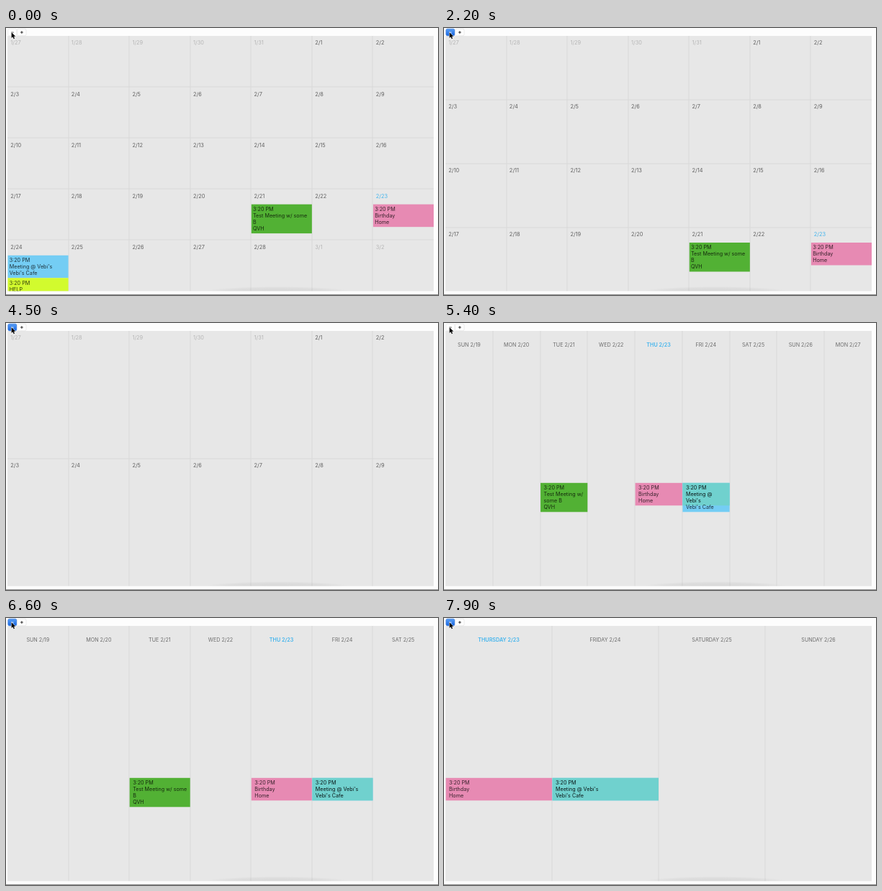
An HTML page with a canvas that plays this animation: 600 px wide and 372 px high, repeating every 8 s.

```html
<!DOCTYPE html>
<html lang="en">
<head>
<meta charset="utf-8">
<title>Calendar zoom</title>
<style>
  html, body { margin: 0; width: 100%; height: 100%; overflow: hidden; background: #fdfdfd; }
  canvas { display: block; }
</style>
</head>
<body>
<canvas id="stage" width="600" height="372"></canvas>
<script>
const ctx = document.getElementById('stage').getContext('2d');
const LOOP = 8000;
const GRID = { x: 2, y: 11, w: 592, h: 355.6 };
const TODAY = 23;
const LINE_HEIGHT = 9;
const EVENT_FONT = '7.2px Inter, sans-serif';

// [start ms, unit, count]
const VIEWS = [
  [0, 'weeks', 5], [900, 'weeks', 4], [2400, 'weeks', 3], [3700, 'weeks', 2],
  [5100, 'days', 10], [5400, 'days', 9], [5700, 'days', 8], [6200, 'days', 7],
  [6800, 'days', 6], [7100, 'days', 5], [7400, 'days', 4]
];

// The minus button alternates between pressed and released at these times.
const TOGGLES = [
  300, 900, 1000, 1100, 1200, 1500, 1600, 1800, 2000, 2100, 2200, 2700, 2900, 3000, 3100,
  4100, 4500, 4600, 4700, 4800, 4900, 5100, 5200, 5300, 5500, 5700, 5800, 6000, 6100,
  6200, 6300, 6400, 6600, 6700, 6800, 6900, 7000, 7100, 7200, 7300, 7400, 7500, 7600,
  7800, 7900
];

const EVENTS = [
  { day: 21, color: '#52b134', title: 'Test Meeting w/ some B', place: 'QVH' },
  { day: 23, color: '#e78ab3', title: 'Birthday', place: 'Home' },
  { day: 24, color: '#74cdf4', title: "Meeting @ Vebi's", place: "Vebi's Cafe" },
  { day: 24, color: '#d2fb2e', title: 'HELP', place: 'Home', monthOnly: true }
];

const WEEKDAYS = ['SUNDAY', 'MONDAY', 'TUESDAY', 'WEDNESDAY', 'THURSDAY', 'FRIDAY', 'SATURDAY'];

function rect(x, y, w, h, color) {
  ctx.fillStyle = color;
  ctx.fillRect(x, y, w, h);
}

function text(string, x, y, color, font, align = 'left') {
  ctx.font = font;
  ctx.textAlign = align;
  ctx.fillStyle = color;
  ctx.fillText(string, x, y);
}

function wrap(string, width) {
  ctx.font = EVENT_FONT;
  const lines = [];
  let line = '';
  for (const word of string.split(' ')) {
    const longer = line ? line + ' ' + word : word;
    if (line && ctx.measureText(longer).width > width) {
      lines.push(line);
      line = word;
    } else {
      line = longer;
    }
  }
  return [...lines, line];
}

// Draws one event and returns its height.
function drawEvent(event, x, y, width, inDays) {
  const lines = ['3:20 PM', ...wrap(event.title, width - 9), event.place];
  const height = lines.length * LINE_HEIGHT + 4.5;
  const doubled = inDays && event.day === 24;
  rect(x + 0.5, y, width - 0.5, height, event.color);
  if (doubled) rect(x + 0.5, y, width - 0.5, 3 * LINE_HEIGHT + 4.5, '#70d1ce');
  lines.forEach((line, i) => text(line, x + (inDays ? 5 : 2.7), y + 9.3 + i * LINE_HEIGHT,
    doubled && i < 3 ? '#0a1616' : 'rgba(0,0,0,.76)', EVENT_FONT));
  return height;
}

function columnLines(count) {
  for (let i = 1; i < count; i++) {
    rect(Math.round(GRID.x + i * GRID.w / count) - 0.5, GRID.y, 1, GRID.h, '#d9d9d9');
  }
}

function monthDate(index) {
  if (index < 5) return [1, 27 + index];
  if (index < 33) return [2, index - 4];
  return [3, index - 32];
}

function drawWeeks(count) {
  const colW = GRID.w / 7, rowH = GRID.h / count;
  columnLines(7);
  for (let r = 1; r < count; r++) {
    rect(GRID.x, Math.round(GRID.y + r * rowH) - 0.5, GRID.w, 1, '#dadada');
  }
  for (let i = 0; i < count * 7; i++) {
    const x = GRID.x + (i % 7) * colW;
    const y = GRID.y + Math.floor(i / 7) * rowH;
    const [month, day] = monthDate(i);
    const today = month === 2 && day === TODAY;
    const color = today ? '#41b4ed' : month === 2 ? '#606060' : '#b5b5b5';
    text(`${month}/${day}`, x + 4.3, y + 12.4, color, '7.4px Inter, sans-serif');
    if (month !== 2) continue;
    let top = y + 21.3;
    for (const event of EVENTS) {
      if (event.day === day) top += drawEvent(event, x, top, colW, false);
    }
  }
}

function drawDays(count) {
  const colW = GRID.w / count;
  const first = count > 4 ? 19 : TODAY;
  columnLines(count);
  for (let i = 0; i < count; i++) {
    const day = first + i, x = GRID.x + i * colW;
    const name = WEEKDAYS[(day - 19) % 7];
    const today = day === TODAY;
    text(`${count > 4 ? name.slice(0, 3) : name} 2/${day}`, x + colW / 2, 32.7,
      today ? '#41b4ed' : '#6c6c6c', `${today ? 600 : 400} 7.2px Inter, sans-serif`, 'center');
    for (const event of EVENTS) {
      if (event.day === day && !event.monthOnly) drawEvent(event, x, 222.8, colW, true);
    }
  }
}

function drawDockShadow() {
  ctx.save();
  ctx.translate(377, 367);
  ctx.scale(100, 7);
  const glow = ctx.createRadialGradient(0, 0, 0, 0, 0, 1);
  glow.addColorStop(0, 'rgba(0,0,0,.07)');
  glow.addColorStop(0.7, 'rgba(0,0,0,.045)');
  glow.addColorStop(1, 'rgba(0,0,0,0)');
  rect(-1, -1, 2, 1, glow);
  ctx.restore();
}

function button(x, w, fill, border) {
  ctx.beginPath();
  ctx.roundRect(x, 1.2, w, 9.6, 2);
  ctx.fillStyle = fill;
  ctx.fill();
  ctx.strokeStyle = border;
  ctx.lineWidth = 0.6;
  ctx.stroke();
}

function drawButtons(pressed) {
  const blue = ctx.createLinearGradient(0, 1, 0, 11);
  blue.addColorStop(0, '#5a9ff5');
  blue.addColorStop(1, '#1766e2');
  button(2.8, 12, pressed ? blue : '#ffffff', pressed ? '#2a6fd8' : '#e2e2e2');
  button(15.6, 12.4, '#ffffff', '#dedede');
  rect(7, 5.6, 3.6, 0.9, pressed ? '#ffffff' : '#333333');
  rect(20, 5.6, 3.8, 0.9, '#222222');
  rect(21.45, 4.1, 0.9, 3.8, '#222222');
}

function drawCursor() {
  ctx.lineWidth = 1;
  ctx.strokeStyle = '#ffffff';
  ctx.fillStyle = '#000000';
  const arrow = new Path2D('M7.6 5.9V13.9L9.4 12.2L10.7 15.2L12 14.6L10.8 11.8H13.2Z');
  ctx.stroke(arrow);
  ctx.fill(arrow);
}

function draw(time) {
  rect(0, 0, 600, 372, '#fdfdfd');
  rect(GRID.x, GRID.y, GRID.w, GRID.h, '#e7e7e7');
  ctx.save();
  ctx.beginPath();
  ctx.rect(GRID.x, GRID.y, GRID.w, GRID.h);
  ctx.clip();
  const [, unit, count] = VIEWS.findLast(view => view[0] <= time);
  if (unit === 'weeks') drawWeeks(count);
  else drawDays(count);
  drawDockShadow();
  ctx.restore();
  rect(0, 371, 600, 1, '#8c8c8c');
  drawButtons(TOGGLES.filter(t => t <= time).length % 2 === 1);
  drawCursor();
}

const start = performance.now();
function frame() {
  draw((performance.now() - start) % LOOP);
  requestAnimationFrame(frame);
}
frame();
</script>
</body>
</html>
```
